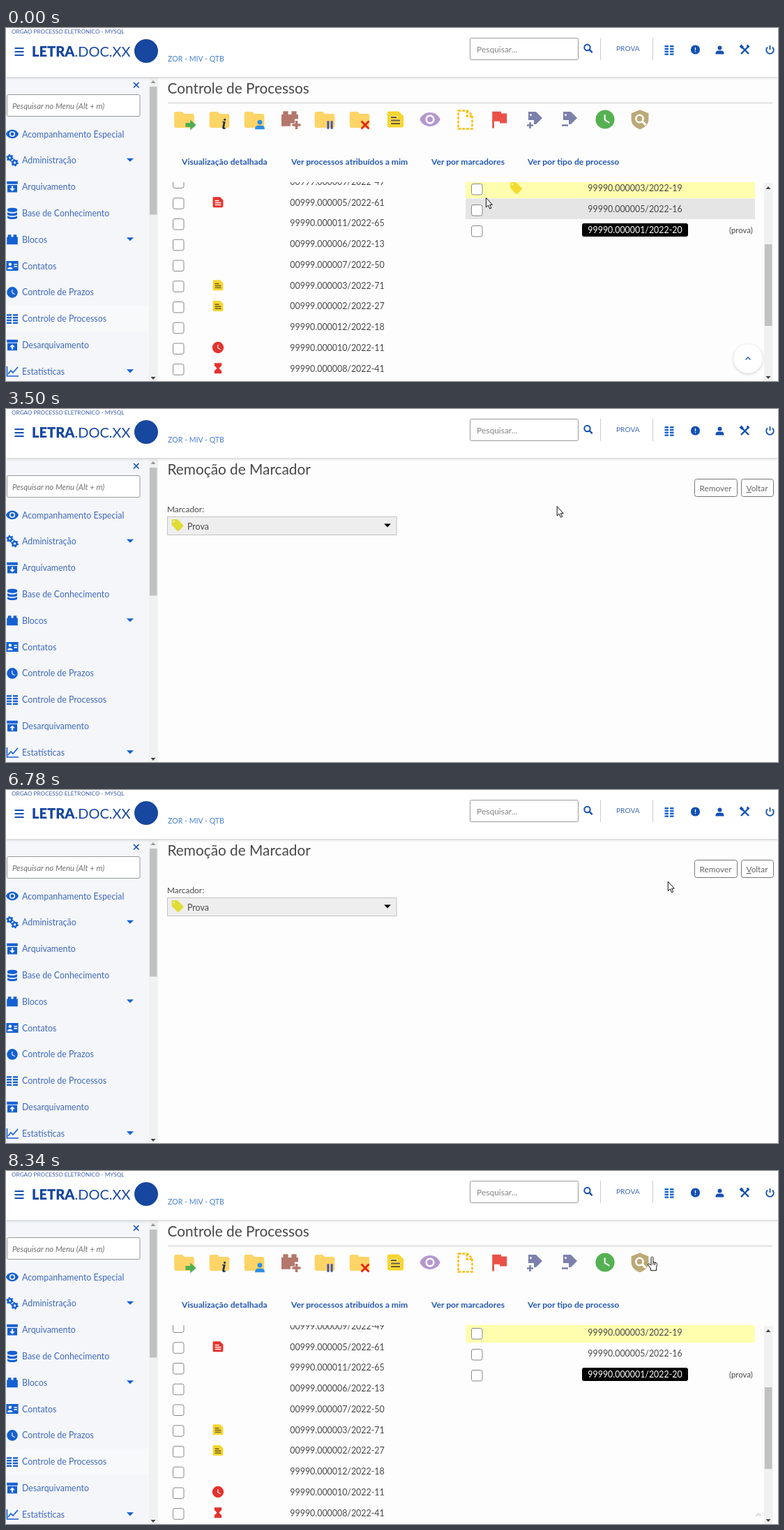
Recreate the animation shown at these times as an HTML page. Size 1107 by 506 pixels, loop 8410 ms.

```html
<!DOCTYPE html>
<html lang="pt">
<head>
<meta charset="utf-8">
<title>Controle de Processos</title>
<style>
html, body { margin: 0; width: 100%; height: 100%; overflow: hidden; background: #fdfdfd }
svg { display: block; font-family: Lato, sans-serif }
</style>
</head>
<body>
<svg id="stage" width="1107" height="506" viewBox="0 0 1107 506">
  <defs>
    <clipPath id="listClip"><path d="M218 221H1107V506H218z"/></clipPath>
    <filter id="soft" x="-30%" y="-30%" width="160%" height="160%">
      <feDropShadow dx="0" dy="1" stdDeviation="2" flood-opacity=".22"/>
    </filter>
  </defs>
  <g id="page"></g>
  <g id="frame"></g>
  <g id="over"></g>
</svg>
<script>
const LOOP = 8410, BLUE = '#1351b4', ICON = '#1460d2', LINK = '#3f69bd', INK = '#484848', EDGE = '#999';
const $ = id => document.getElementById(id);

const rect = (x, y, w, h, fill, more = '') =>
  `<rect x="${x}" y="${y}" width="${w}" height="${h}" fill="${fill}" ${more}/>`;
const circle = (x, y, r, fill, more = '') => `<circle cx="${x}" cy="${y}" r="${r}" fill="${fill}" ${more}/>`;
const text = (x, y, s, size = 12.4, fill = INK, more = '') =>
  `<text x="${x}" y="${y}" font-size="${size}" fill="${fill}" ${more}>${s}</text>`;
const line = (d, stroke, w = 1, more = '') =>
  `<path d="${d}" fill="none" stroke="${stroke}" stroke-width="${w}" ${more}/>`;
// Icons live on a 24-unit grid, centred on (x, y)
const at = (x, y, k, body) => `<g transform="translate(${x} ${y}) scale(${k}) translate(-12 -12)">${body}</g>`;
const icon = (name, x, y, k, fill) => at(x, y, k, `<path d="${shapes[name]}" fill="${fill}" fill-rule="evenodd"/>`);
const MID = 'text-anchor="middle"';

const shapes = {
  eye: 'M12 4.5C7 4.5 2.7 7.6 1 12c1.7 4.4 6 7.5 11 7.5s9.3-3.1 11-7.5c-1.7-4.4-6-7.5-11-7.5zM12 17a5 5 0 010-10 5 5 0 010 10zM12 9a3 3 0 000 6 3 3 0 000-6z',
  folder: 'M10 4H4a2 2 0 00-2 2v12a2 2 0 002 2h16a2 2 0 002-2V8a2 2 0 00-2-2h-8z',
  clock: 'M12 2a10 10 0 000 20 10 10 0 000-20zM16.2 16.2L11 13V7h1.5v5.2l4.5 2.7z',
  tag: 'M21.4 11.6l-9-9A2 2 0 0011 2H4a2 2 0 00-2 2v7a2 2 0 00.6 1.4l9 9a2 2 0 002.8 0l7-7a2 2 0 000-2.8zM5.5 4a1.5 1.5 0 010 3 1.5 1.5 0 010-3z',
  label: 'M2 3h11l9 9-9 9h-3v-6H2zM5.5 6a1.5 1.5 0 000 3 1.5 1.5 0 000-3z',
  flag: 'M14.4 6L14 4H5v17h2v-7h5.6l.4 2h7V6z',
  person: 'M12 12a4.500 4.500 0 000-9 4.500 4.500 0 000 9zM9 13.500c-4 0-6 2.500-6 5.500v2h18v-2c0-3-2-5.500-6-5.500z',
  alert: 'M12 2a10 10 0 000 20 10 10 0 000-20zM13 17h-2v-2h2zM13 13h-2V7h2z',
  glass: 'M5 2v5l5 5-5 5v5h14v-5l-5-5 5-5V2z',
  arrow: 'M2 8h9V2l11 10-11 10v-6H2z',
  cross: 'M5 2l7 7 7-7 3 3-7 7 7 7-3 3-7-7-7 7-3-3 7-7-7-7z',
  plus: 'M9 2h6v7h7v6h-7v7H9v-7H2V9h7z',
  pause: 'M5 2h5v20H5zM14 2h5v20h-5z',
  brick: 'M2 7h2V3h6v4h4V3h6v4h2v14H2z',
  note: 'M4 2h12l6 6v12a2 2 0 01-2 2H4a2 2 0 01-2-2V4a2 2 0 012-2zM6 8v2h8V8zM6 12v2h12v-2zM6 16v2h12v-2z',
  shield: 'M12 1L2 5v7c0 5.500 4.300 9.600 10 11.500 5.700-1.900 10-6 10-11.500V5z',
  inbox: 'M2 2h20v5H2zM3 8.500h18V22H3zM10.500 10.500V15H7l5 5 5-5h-3.500v-4.500z',
  outbox: 'M2 2h20v5H2zM3 8.500h18V22H3zM10.500 20v-4.500H7l5-5 5 5h-3.500V20z',
  card: 'M1 3h22v18H1zM8 6a3 3 0 000 6 3 3 0 000-6zM3 18h10c0-5-10-5-10 0zM15 8v2h6V8zM15 12v2h6v-2z',
  stack: 'M3 5c0-4 18-4 18 0v2c0 4-18 4-18 0zM3 10c4 3 14 3 18 0v4c0 4-18 4-18 0zM3 17c4 3 14 3 18 0v3c0 4-18 4-18 0z',
  caret: 'M0 6h24L12 18z'
};
const grid = (x, y, w) => [0, 1, 2, 3].map(i =>
  rect(x, y + i * 3.8, w, 2.4, ICON) + rect(x + w + 2, y + i * 3.8, w, 2.4, ICON)).join('');
const gear = (x, y, r) => circle(x, y, r, 'none', `stroke="${ICON}" stroke-width="2.6"`) +
  circle(x, y, r + 1.6, 'none', `stroke="${ICON}" stroke-width="1.8" stroke-dasharray="2 ${(r + 1.6) * Math.PI / 3 - 2}"`);
const tri = (x, y, up, fill) => `<path d="M${x - 3.5} ${y + (up ? 2 : -2)}h7l-3.5 ${up ? -4 : 4}z" fill="${fill}"/>`;
const magnifier = (x, y, r, color, w) =>
  line(`M${x + r * .7} ${y + r * .7}l${r} ${r}`, color, w * 1.2) + circle(x, y, r, 'none', `stroke="${color}" stroke-width="${w}"`);

const menu = ['Acompanhamento Especial', 'Administração', 'Arquivamento', 'Base de Conhecimento', 'Blocos',
  'Contatos', 'Controle de Prazos', 'Controle de Processos', 'Desarquivamento', 'Estatísticas'];
const menuIcons = ['eye', '', 'inbox', 'stack', 'brick', 'card', 'clock', '', 'outbox', ''];

function header() {
  return rect(0, 0, 1107, 70, '#fff', 'filter="url(#soft)"') +
    text(8, 8, 'ORGAO PROCESSO ELETRONICO - MYSQL', 8.2, '#3b5fae') +
    line('M12.500 29H25.500M12.500 34H25.500M12.500 39H25.500', BLUE, 2) +
    text(37, 41, '<tspan font-weight="900">LETRA</tspan>.DOC.XX', 20, '#17479e') +
    circle(201, 33, 17, '#17479e') +
    text(232, 48, 'ZOR - MIV - QTB', 10.6, '#4a80d0') +
    rect(665.5, 14.5, 155, 31, '#fff', `rx="2" stroke="${EDGE}"`) +
    text(675, 35, 'Pesquisar...', 12, '#858585') +
    magnifier(833.5, 28, 4.2, BLUE, 2) +
    line('M852.500 14V46M927.500 14V46', '#ccc') +
    text(875, 33, 'PROVA', 10.2, LINK) +
    grid(944.5, 25, 5.5) + icon('alert', 988.5, 31, .66, BLUE) + icon('person', 1023.5, 31.5, .66, BLUE) +
    line('M1054 26l11 11M1065 26l-11 11', BLUE, 2.4) + line('M1053 25l3.500 3.500M1065 25l-2 2', BLUE, 4) +
    line('M1092 27.500a5.300 5.300 0 1 0 7 0M1095.500 25v6', BLUE, 1.8);
}

function sidebar(hover) {
  let s = rect(0, 71, 205, 435, '#f4f6f9') + rect(205, 71, 13, 435, '#f1f1f1') +
    rect(206, 84, 10.5, 183.5, '#c1c1c1') + tri(211, 77, 1, '#999') + tri(211, 502, 0, '#444') +
    line('M183 78l7.500 7.500M190.500 78l-7.500 7.500', BLUE, 1.7) +
    rect(1.5, 95.5, 190.5, 31, '#fff', `rx="2" stroke="${EDGE}"`) +
    text(9, 116, 'Pesquisar no Menu (Alt + m)', 11.4, '#707070', 'font-style="italic"');
  if (hover) s += rect(0, 398, 205, 38, '#f8f9fb');
  menu.forEach((name, i) => {
    const y = 152 + i * 37.82;
    if (menuIcons[i]) s += icon(menuIcons[i], 9, y, i ? .78 : .82, ICON);
    s += text(23, y + 4.5, name, 12.4, LINK);
    if (i == 1 || i == 4 || i == 9) s += icon('caret', 178, y - .5, .42, ICON);
  });
  return s + gear(5.5, 186, 2.7) + gear(12.5, 193, 3) + grid(1, 410.2, 7) +
    line('M1.500 485V499H18M3 496l4-5 3 3 7-8', ICON, 1.6);
}

function toolbar() {
  const label = x => icon('label', x + 2, 129, 1, '#7c80ab');
  return text(231.5, 94, 'Controle de Processos', 20.8, INK) +
    line('M232 107.500H1099', '#ccc') +
    [255.5, 306, 356, 457, 507].map(x => icon('folder', x, 131.5, 1.43, '#fdd466')).join('') +
    icon('arrow', 265, 139, .76, '#4caf50') +
    text(309, 145, 'i', 19, '#263050', 'font-style="italic" font-weight="900" font-family="Noto Serif, serif"') +
    icon('person', 364, 138.5, .76, '#2e8de8') + icon('pause', 464.5, 139, .58, '#3f51b5') + icon('cross', 515, 139, .64, '#e62117') +
    icon('brick', 407, 130, 1.2, '#b3776b') + icon('plus', 416.5, 139, .86, '#fff') + icon('plus', 416.5, 139, .6, '#b3776b') +
    icon('note', 558.5, 131, 1.16, '#f7d530') + line('M552 128h8M552 132.500h13M552 137h13', '#6a5828', 2) +
    icon('eye', 608, 131, 1.33, '#b497d0') +
    line('M648.500 118.500h13l7 7v19h-20zM661 118.500v8h8', '#fbbc04', 2.4, 'stroke-dasharray="4 1.8"') +
    icon('flag', 707, 131, 1.4, '#ea5148') +
    label(757) + label(807) + line('M747 139.500h9M751.500 135v9M797 139.500h9', '#7c80ab', 2.6) +
    icon('clock', 859, 131, 1.36, '#55b152') +
    icon('shield', 909, 131, 1.24, '#bca977') + magnifier(908.5, 130, 5.2, '#fff', 2.6) +
    [[252, 'Visualização detalhada'], [409, 'Ver processos atribuídos a mim'], [610, 'Ver por marcadores'],
     [748, 'Ver por tipo de processo']].map(([x, s]) => text(x, 195.5, s, 12.15, '#2459b3', 'font-weight="700"')).join('');
}

const left = ['00999.000009/2022-49', '00999.000005/2022-61', '99990.000011/2022-65', '00999.000006/2022-13',
  '00999.000007/2022-50', '00999.000003/2022-71', '00999.000002/2022-27', '99990.000012/2022-18',
  '99990.000010/2022-11', '99990.000008/2022-41', '99990.000007/2022-05'];
const right = ['99990.000003/2022-19', '99990.000005/2022-16', '99990.000001/2022-20'];
const tightLeft = [222, 248, 276, 302, 329, 357, 386, 414, 442, 472, 500], tightRight = [230, 256, 282.5];
const marks = {1: ['note', '#e5322d'], 5: ['note', '#f5d62f'], 6: ['note', '#f5d62f'], 8: ['clock', '#e5322d'], 9: ['glass', '#e5322d']};
const check = (x, y) => rect(x - 7.5, y - 7.5, 15.5, 15.5, '#fff', 'rx="2.500" stroke="#888"');

function list(t) {
  const fresh = t > 7000, tight = fresh && t < 7870, dy = fresh && !tight ? 2 : 0;
  const yl = i => tight ? tightLeft[i] : 220.5 + i * 29.75 + dy;
  const yr = i => tight ? tightRight[i] : 230 + i * 30 + dy;
  const blue = fresh ? 0 : Math.min(1, Math.max(0, (t - 830) / 250));
  const hoverFirst = t >= 140 && t < 1290;
  let s = rect(659, yr(0) - 15, 415, 29, hoverFirst ? '#e4e4e4' : '#fffeae');
  if (t < 200) s += rect(659, 244.5, 415, 29.5, '#e4e5e4');
  if (blue) s += rect(659, 215, 415, 29, '#2672e8', `opacity="${blue.toFixed(2)}"`);
  left.forEach((n, i) => {
    const y = yl(i), m = marks[i];
    if (!tight) s += check(247, y + 1);
    if (m) {
      const x = tight ? 302 : 304, warm = m[1] != '#e5322d';
      if (warm) s += rect(x - 5, y - 4, 10, 8, '#6f5b20');
      s += icon(m[0], x, y - .5, m[0] == 'clock' ? .82 : .74, m[1]);
    }
    s += text(475, y + 4.4, n, 12.4, INK, MID);
  });
  right.forEach((n, i) => {
    const y = yr(i), x = tight ? 901 : 902;
    if (!tight) s += check(675, y + 1);
    if (i == 2) s += rect(x - 76, y - 10, 152, 19, '#000', 'rx="3"');
    s += text(x, y + 4.4, n, 12.4, i == 2 || !i && blue > .5 ? '#fff' : INK, MID);
  });
  s += text(1037, yr(2) + 4.4, '(prova)', 11.4);
  if (!fresh) {
    s += icon('tag', 731.5, 229.5, .84, '#f3dc2f');
    if (t >= 740) s += rect(667, 223, 16, 16, '#2672e8', 'rx="2.500" stroke="#8ab4f4"') + line('M671 232l3 3.500 5.500-9', '#fff', 2.2);
  }
  s += rect(1087, 222, 12.5, 284, '#f1f1f1') + tri(1093, 229, 1, '#444') + tri(1093, 501, 0, '#444') +
    rect(1088, tight ? 319 : 310, 10.5, tight ? 134 : 117, '#c1c1c1');
  if (!fresh) s += circle(1064, 474, 20.5, '#fff', 'filter="url(#soft)"') + line('M1060.500 475.500l3.500-3.500 3.500 3.500', BLUE, 1.4);
  else if (t >= 8200) s += line('M1075.500 494.500l3.500-3.500 3.500 3.500', '#c4c8d0', 1.2);
  return `<g clip-path="url(#listClip)">${s}</g>`;
}

function removal(t) {
  const button = (x, w, s) => rect(x + .5, 100.5, w, 25, '#fff', 'rx="3" stroke="#777"') + text(x + w / 2, 118, s, 11.8, '#666', MID);
  const entry = y => icon('tag', 246, y - 1.5, .84, '#dfdc35') + text(260, y + 4.5, 'Prova');
  let s = text(231.5, 94, 'Remoção de Marcador', 20.8, INK) +
    button(987, 61, 'Remover') + button(1054, 46, '<tspan text-decoration="underline">V</tspan>oltar') +
    text(231, 148, 'Marcador:', 11.9) +
    rect(231.5, 154.5, 328.5, 26, '#eee', 'stroke="#c4c4c4"') + entry(168) + icon('caret', 547, 167, .4, '#000');
  if (t >= 4460 && t < 5480)
    s += rect(231.5, 180.5, 328.5, 50, '#fff', 'stroke="#bbb"') +
      (t >= 5000 ? rect(232, 205, 328, 25, '#f3f3f3') : '') + line('M232 205.500H560', '#ddd') + entry(218);
  return s;
}

// Pointer path: time, x, y
const path = [[0, 688, 243], [270, 672, 227], [1200, 672, 227], [1560, 790, 162], [1800, 807, 122], [2040, 801, 136],
  [3430, 801, 136], [3500, 790, 139], [4260, 542, 177], [4760, 542, 177], [5260, 500, 216], [5400, 500, 216],
  [5630, 570, 215], [5960, 693, 213], [6200, 693, 213], [6920, 1010, 111], [7120, 1010, 111], [7390, 926, 119],
  [7800, 926, 119], [7870, 920, 123], [LOOP, 920, 123]];

function pointer(t) {
  const i = path.findIndex(p => p[0] > t), [t0, x0, y0] = path[i - 1], [t1, x1, y1] = path[i];
  const k = (t - t0) / (t1 - t0), x = x0 + (x1 - x0) * k, y = y0 + (y1 - y0) * k;
  const hand = t >= 1720 && t < 2240 || t >= 6850 && t < 7190 || t >= 7870;
  const d = hand ? 'M5 1.500c0-2 3-2 3 0v6l4.500 1.200c1.200.4 1.200 1.500 1 3l-1 4v4H4.500v-3L.8 12c-1-1.500.5-2.800 2-1.500L5 12zM8 7.500v4M10.500 8.500v3.500'
    : 'M.5.500V14l3-2.800 2.300 5 2.200-1-2.300-4.700H9.500z';
  return `<path transform="translate(${x.toFixed(1)} ${y.toFixed(1)})" d="${d}" fill="#fff" stroke="${t >= 7390 && !hand ? '#4b4790' : '#111'}"/>`;
}

const within = (t, a, b) => t >= a && t < b;
function page(t) {
  if (within(t, 2440, 7390)) return removal(t);
  if (within(t, 2390, 2440) || within(t, 7390, 7480)) return '';
  return toolbar() + (within(t, 7480, 7570) ? '' : list(t));
}
function status(t) {
  return within(t, 2110, 2440) || within(t, 7120, 8000)
    ? `<path d="M0 491H363q3 0 3 3V506H0z" fill="#dee0e8" stroke="#cfd1da"/>` +
      text(-1, 504, 'A aguardar pela cache...', 10.4, '#333', 'font-family="Noto Sans, sans-serif"') : '';
}

const last = {};
function put(id, html) {
  if (last[id] !== html) $(id).innerHTML = last[id] = html;
}
const start = performance.now();
function draw(now) {
  const t = Math.max(0, now - start) % LOOP;
  put('page', page(t));
  put('frame', sidebar(t < 2390 || t >= 7120) + header());
  put('over', status(t) + pointer(t));
  requestAnimationFrame(draw);
}
draw(start);
</script>
</body>
</html>
```
